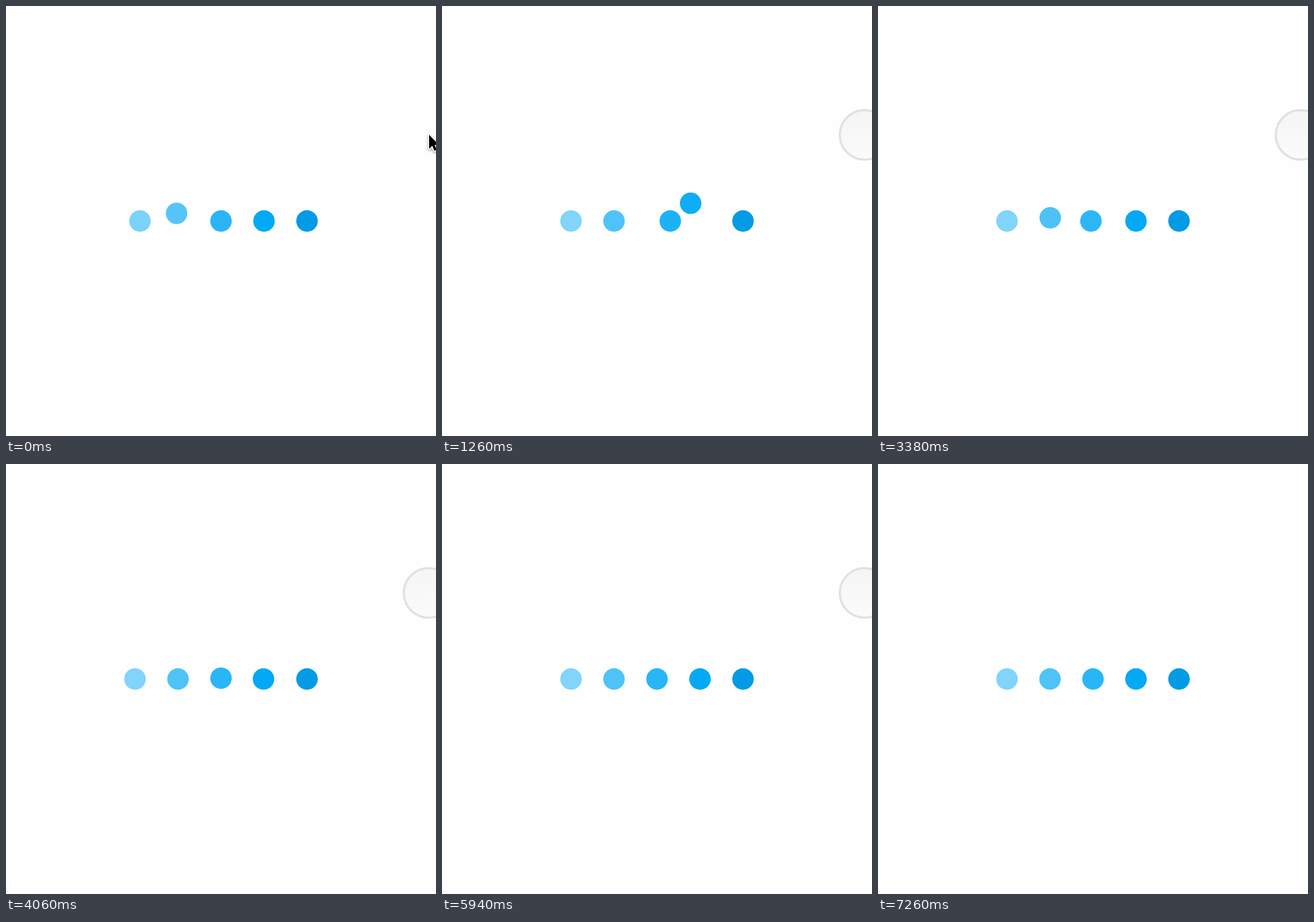
Animation of 748 by 748 pixels, one loop 7580 ms. Source, as an HTML page with a canvas:

```html
<!DOCTYPE html>
<html lang="en">
<head>
<meta charset="utf-8">
<title>Swapping dots</title>
<style>
  html, body { margin: 0; width: 100%; height: 100%; overflow: hidden; background: #fefefe; }
  canvas { display: block; }
</style>
</head>
<body>
<canvas id="stage" width="748" height="748"></canvas>
<script>
const ctx = document.getElementById('stage').getContext('2d');
const LOOP = 7580, SWAP = 602, LEAD = 67, SWAPS = 12;
const GAP = 74.8, RADIUS = 18.7, LEFT = 224.4, MID = 374;
const POINTER_UNTIL = 160, DISC_UNTIL = 6460;
const COLORS = [[129, 212, 250], [79, 195, 247], [41, 182, 246], [3, 169, 244], [3, 155, 229]];
const ARROW = new Path2D('M736 224V248.5L741.5 243.2L745.2 252L749.2 250.3L745.6 241.8H753.5Z');

// CSS "ease": cubic-bezier(.25, .1, .25, 1)
function ease(x) {
  let lo = 0, hi = 1, s = 0.5;
  for (let i = 0; i < 24; i++) {
    s = (lo + hi) / 2;
    if (0.75 * s * (1 - s) + s ** 3 < x) lo = s; else hi = s;
  }
  return 0.3 * s * (1 - s) ** 2 + 3 * s * s * (1 - s) + s ** 3;
}

const mix = (a, b, p) => `rgb(${a.map((v, i) => Math.round(v + (b[i] - v) * p))})`;

function dot(x, y, color) {
  ctx.fillStyle = color;
  ctx.beginPath();
  ctx.arc(x, y, RADIUS, 0, 2 * Math.PI);
  ctx.fill();
}

function drawDots(t) {
  const step = (t + LEAD) / SWAP;
  const pair = step < SWAPS ? Math.floor(step) % 4 : -9;
  COLORS.forEach((c, i) => {
    if (i !== pair && i !== pair + 1) dot(LEFT + i * GAP, MID, mix(c, c, 0));
  });
  if (pair < 0) return;

  // the left dot slides right while its neighbour hops over it
  const p = ease(step % 1), a = COLORS[pair], b = COLORS[pair + 1];
  const x = LEFT + pair * GAP, half = GAP / 2;
  dot(x + GAP * p, MID, mix(a, b, p));
  dot(x + half + half * Math.cos(Math.PI * p), MID - half * Math.sin(Math.PI * p), mix(b, a, p));
}

function drawArrow() {
  ctx.save();
  ctx.lineJoin = 'round';
  ctx.lineWidth = 3.5;
  ctx.strokeStyle = '#fff';
  ctx.shadowColor = 'rgba(0,0,0,.4)';
  ctx.shadowBlur = 4;
  ctx.shadowOffsetY = 2;
  ctx.stroke(ARROW);
  ctx.restore();
  ctx.fillStyle = '#000';
  ctx.fill(ARROW);
}

function drawDisc() {
  const fill = ctx.createLinearGradient(0, 180, 0, 268);
  fill.addColorStop(0, '#f5f5f5');
  fill.addColorStop(1, '#fbfbfb');
  ctx.beginPath();
  ctx.arc(735, 224.3, 43, 0, 2 * Math.PI);
  ctx.fillStyle = fill;
  ctx.fill();
  for (const [width, color] of [[4.6, '#eeeeee'], [2.4, '#dedede']]) {
    ctx.lineWidth = width;
    ctx.strokeStyle = color;
    ctx.stroke();
  }
}

const start = performance.now();
function frame() {
  const t = (performance.now() - start) % LOOP;
  ctx.fillStyle = '#fefefe';
  ctx.fillRect(0, 0, 748, 748);
  drawDots(t);
  if (t < POINTER_UNTIL) drawArrow();
  else if (t < DISC_UNTIL) drawDisc();
  requestAnimationFrame(frame);
}
frame();
</script>
</body>
</html>
```
